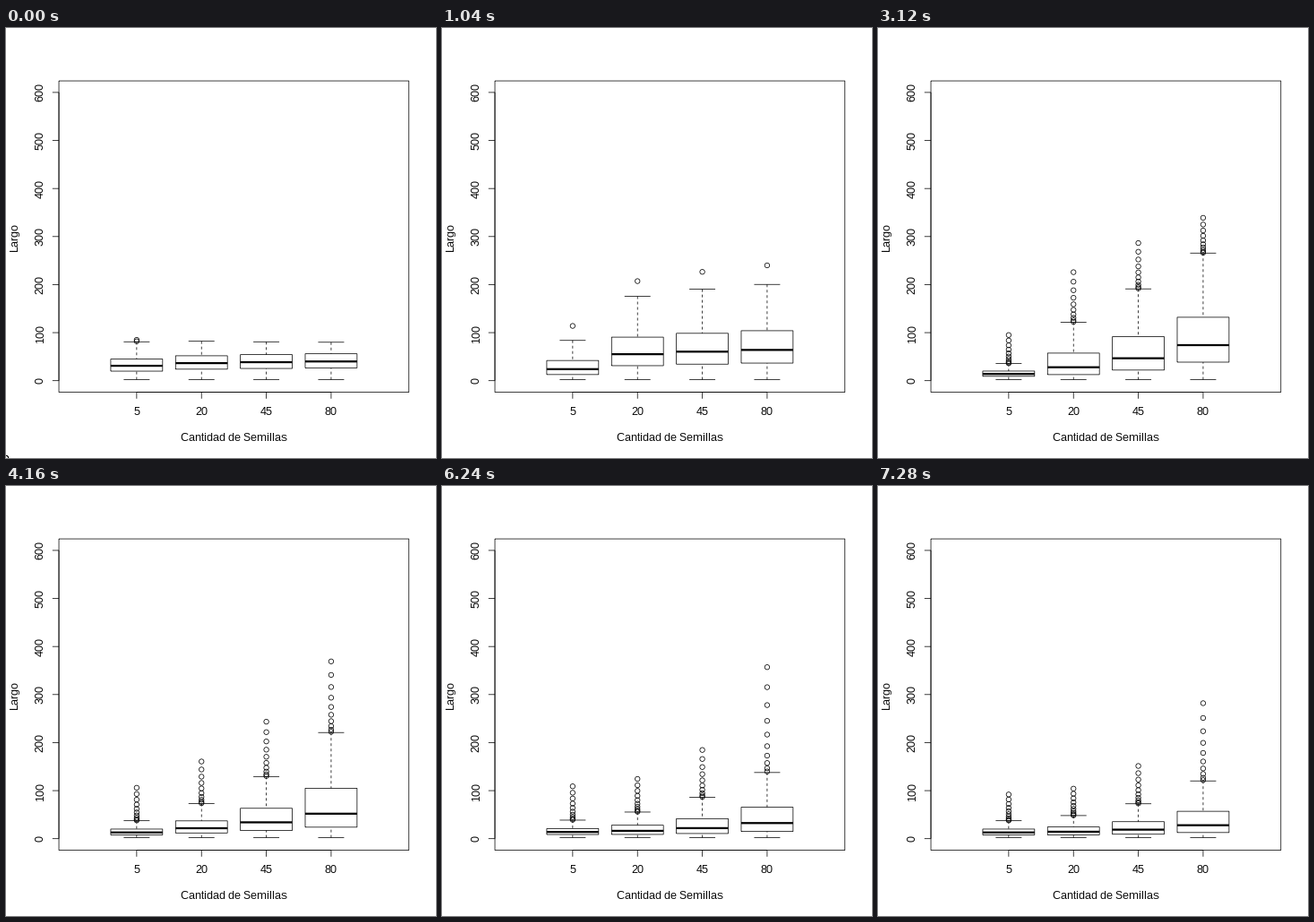
A matplotlib script that plays this animation: 480 by 480 pixels, repeating every 8 s.

```python
import numpy as np
import matplotlib.pyplot as plt
from matplotlib.animation import FuncAnimation

plt.rcParams["font.family"] = "Liberation Sans"
plt.rcParams["text.hinting"] = "native"
plt.rcParams["text.hinting_factor"] = 1

PX = 0.75                       # points per pixel at 96 dpi
THIN = 0.75 * PX
LEFT, RIGHT, TOP, BOTTOM = 59.04, 449.76, 59.04, 406.56
XU = (RIGHT - LEFT) / 1.08 / 5
YU = (BOTTOM - TOP) / 1.08 / 600

STEP = 80
FRAMES = 100
HOLD = 13
SHORTEST = 2

fig = plt.figure(figsize=(5, 5), dpi=96, facecolor="white")
ax = fig.add_axes([0, 0, 1, 1])
ax.set_xlim(0, 480)
ax.set_ylim(480, 0)
ax.axis("off")


def px(x):
    return LEFT + XU * (0.2 + x)


def py(v):
    return BOTTOM - YU * (24 + v)


def line(xs, ys, width=THIN, **kw):
    return ax.plot(xs, ys, color="black", lw=width, snap=False,
                   solid_capstyle="butt", solid_joinstyle="miter", **kw)[0]


def label(x, y, text, angle=0):
    ax.text(x, y, text, fontsize=12 * PX, rotation=angle, ha="center",
            va="baseline", rotation_mode="anchor")


def day(median, upper, top, count):
    """Three (first, last, bend) curves over the groups; outlier count."""
    return np.array([median, upper, top], float), count


def between(a, b, peak):
    curves = (a[0] + b[0]) / 2
    curves[2, 1] = peak
    return curves, round((a[1] + b[1]) / 2)


def boxes(curves, count):
    """Skewed box per group: lower quartile and whisker follow by rule."""
    for i in range(4):
        med, q3, top = (a * (b / a) ** ((i / 3) ** bend)
                        for a, b, bend in curves)
        q1 = 0.93 * med ** 2 / q3
        fence = q3 + 1.43 * (q3 - q1)
        outs = np.array([])
        if top > fence:
            u = np.arange(1, count + 1) / count
            outs = fence + (top - fence) * u ** 2
        stats = np.array([SHORTEST, q1, med, q3, min(fence, top)])
        yield i + 1, stats, outs


day1 = day((31, 40, 0.4), (45, 56, 0.4), (85, 80, 0.5), 2)
day2 = day((24, 64, 0.15), (42, 104, 0.15), (114, 240, 0.2), 1)
day4 = day((14, 74, 0.8), (20, 132, 0.53), (95, 339, 0.35), 10)
day5 = day((13, 52, 0.9), (20, 105, 0.9), (106, 369, 1), 10)
day6 = day((15, 37, 1.3), (22, 74, 1), (126, 248, 2), 10)
day8 = day((13, 28, 1.8), (20, 57, 1.5), (92, 282, 2), 10)
days = [day1, day2, between(day2, day4, 394), day4, day5, day6,
        between(day6, day8, 357), day8]


def draw_box(pos, stats, outs):
    x, half, cap = px(pos), 0.4 * XU, 0.2 * XU
    low, q1, med, q3, high = py(stats)
    l, r = x - half, x + half
    dash = dict(ls=(0, (4, 4)), dash_capstyle="butt")
    return [
        line([l, r], [med, med], 3 * THIN),
        line([x, x], [low, q1], **dash),
        line([x, x], [high, q3], **dash),
        line([x - cap, x + cap], [low, low]),
        line([x - cap, x + cap], [high, high]),
        line([l, r, r, l, l], [q1, q1, q3, q3, q1]),
        ax.scatter(np.full(len(outs), x), py(outs), s=(5.4 * PX) ** 2,
                   facecolors="none", edgecolors="black", linewidths=THIN,
                   zorder=3),
    ]


def draw_frame():
    line([LEFT, RIGHT, RIGHT, LEFT, LEFT], [TOP, TOP, BOTTOM, BOTTOM, TOP])
    line([LEFT, LEFT], [py(0), py(600)])
    line([px(1), px(4)], [BOTTOM, BOTTOM])
    for v in range(0, 601, 100):
        line([LEFT - 7.2, LEFT], [py(v), py(v)])
        label(LEFT - 17.28, py(v), str(v), 90)
    for i, seeds in enumerate((5, 20, 45, 80), 1):
        line([px(i), px(i)], [BOTTOM, BOTTOM + 7.2])
        label(px(i), BOTTOM + 25.92, str(seeds))
    label((LEFT + RIGHT) / 2, BOTTOM + 54.72, "Cantidad de Semillas")
    label(LEFT - 46.08, (TOP + BOTTOM) / 2, "Largo", 90)


draw_frame()
groups = [[part for box in boxes(*d) for part in draw_box(*box)]
          for d in days]


def update(frame):
    for k, group in enumerate(groups):
        for part in group:
            part.set_visible(k == frame // HOLD)
    return []


anim = FuncAnimation(fig, update, frames=FRAMES, interval=STEP,
                     init_func=lambda: update(0), repeat=True, repeat_delay=0)
plt.show()
```
